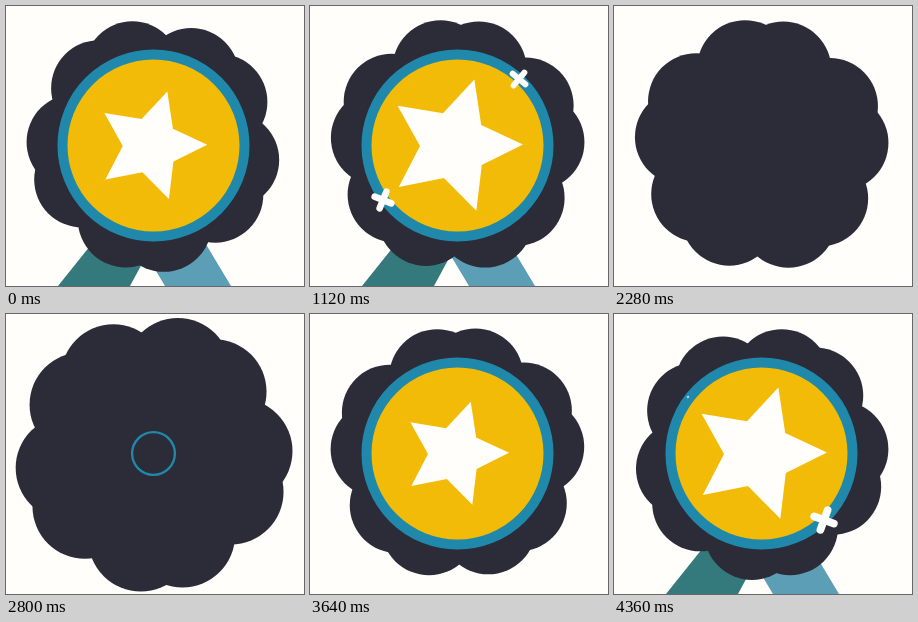
Write an HTML page with a canvas that moves like this. It is 298 px wide and 280 px high and loops after 4.4 s.

```html
<!DOCTYPE html>
<html>
<head>
<meta charset="utf-8">
<title>Award badge</title>
<style>
html, body { margin: 0; width: 100%; height: 100%; overflow: hidden; background: #fffefa; }
canvas { display: block; }
</style>
</head>
<body>
<canvas id="stage" width="298" height="280"></canvas>
<script>
const ctx = document.getElementById('stage').getContext('2d');
const LOOP = 4400, RESTART = 2280, LENGTH = 4740;
const CX = 147.5, CY = 139.5;
const PAPER = '#fffefa', DARK = '#2c2b38', BLUE = '#2089ab', GOLD = '#f2bb08';
const TEAL = '#34797c', SKY = '#5b9eb5';

const clamp = v => Math.max(0, Math.min(1, v));
const span = (c, from, to) => clamp((c - from) / (to - from));
const easeOut = x => 1 - Math.pow(1 - x, 3);
const easeInOut = x => x * x * (3 - 2 * x);
const hump = x => Math.pow(Math.sin(Math.PI * x), 2);

function disc(x, y, r, color) {
  ctx.fillStyle = color;
  ctx.beginPath();
  ctx.arc(x, y, r, 0, 2 * Math.PI);
  ctx.fill();
}

function polygon(points, color) {
  ctx.fillStyle = color;
  ctx.beginPath();
  for (const [x, y] of points) ctx.lineTo(x, y);
  ctx.closePath();
  ctx.fill();
}

// Ten lobes: two five-fold sets 28 degrees apart.
function flower(c) {
  const turn = 42 + 158 * (1 - Math.pow(1 - c / LENGTH, 1.7));
  const size = 1 + 0.095 * hump(span(c, 0, 1080));
  disc(CX, CY, 86 * size, DARK);
  for (let i = 0; i < 5; i++) {
    for (const shift of [0, 28]) {
      const a = (turn + shift + 72 * i) * Math.PI / 180;
      disc(CX + 79 * size * Math.cos(a), CY + 79 * size * Math.sin(a), 48 * size, DARK);
    }
  }
}

function ribbons(c) {
  const drop = easeInOut(span(c, 1360, 1760));
  if (!drop) return;
  const top = 190, end = top + 110 * drop;
  const edge = (x, slope, y) => [x + slope * (y - 280), y];
  polygon([edge(52, -0.8, top), edge(124, -0.54, top),
           edge(124, -0.54, end + 2), edge(52, -0.8, end)], TEAL);
  polygon([edge(159, 0.6, top), edge(225, 0.6, top),
           edge(225, 0.6, end), edge(159, 0.6, end + 2)], SKY);
}

function ring(c) {
  const s = easeOut(span(c, 480, 960));
  if (!s) return;
  ctx.strokeStyle = BLUE;
  ctx.lineWidth = 10 * s;
  ctx.beginPath();
  ctx.arc(CX, CY, 91 * s, 0, 2 * Math.PI);
  ctx.stroke();
}

function star(c) {
  const s = easeOut(span(c, 1200, 1600)) * (1 - 0.18 * hump(span(c, 2240, 2680)));
  if (!s) return;
  const points = [];
  for (let i = 0; i < 10; i++) {
    const r = (i % 2 ? 34 : 69) * s, a = i * Math.PI / 5 - 0.015;
    points.push([CX - 3.5 * s + r * Math.cos(a), CY + r * Math.sin(a)]);
  }
  polygon(points, PAPER);
}

function sparkle(c, x, y, arm, tilt, from, to) {
  const s = Math.min(1, 1.4 * Math.sin(Math.PI * span(c, from, to)));
  if (s < 0.01) return;
  ctx.save();
  ctx.translate(x, y);
  ctx.rotate(tilt * Math.PI / 180);
  ctx.scale(s, s);
  ctx.strokeStyle = PAPER;
  ctx.lineWidth = arm * 0.55;
  ctx.lineCap = 'round';
  const r = arm * 0.75;
  ctx.beginPath();
  ctx.moveTo(-r, 0);
  ctx.lineTo(r, 0);
  ctx.moveTo(0, -r);
  ctx.lineTo(0, r);
  ctx.stroke();
  ctx.restore();
}

function draw(t) {
  const c = t < RESTART ? Math.min(t + LENGTH - RESTART, LENGTH) : t - RESTART;
  ctx.fillStyle = PAPER;
  ctx.fillRect(0, 0, 298, 280);
  ribbons(c);
  flower(c);
  const fill = span(c, 1020, 1400);
  if (fill) disc(CX, CY, 87 * easeOut(fill) * Math.min(1, 0.2 + fill * 2), GOLD);
  ring(c);
  star(c);
  sparkle(c, 210, 206, 14, 20, 1900, 2360);
  sparkle(c, 74, 83, 11, 12, 2072, 2440);
  sparkle(c, 210, 206, 14, 20, 2700, 3180);
  sparkle(c, 74, 83, 11, 12, 2740, 3200);
  sparkle(c, 209, 73, 11, 40, 3340, 3820);
  sparkle(c, 73, 194, 12, 22, 3360, 3840);
}

const start = performance.now();
function tick(now) {
  draw(Math.max(0, now - start) % LOOP);
  requestAnimationFrame(tick);
}
draw(0);
requestAnimationFrame(tick);
</script>
</body>
</html>
```
